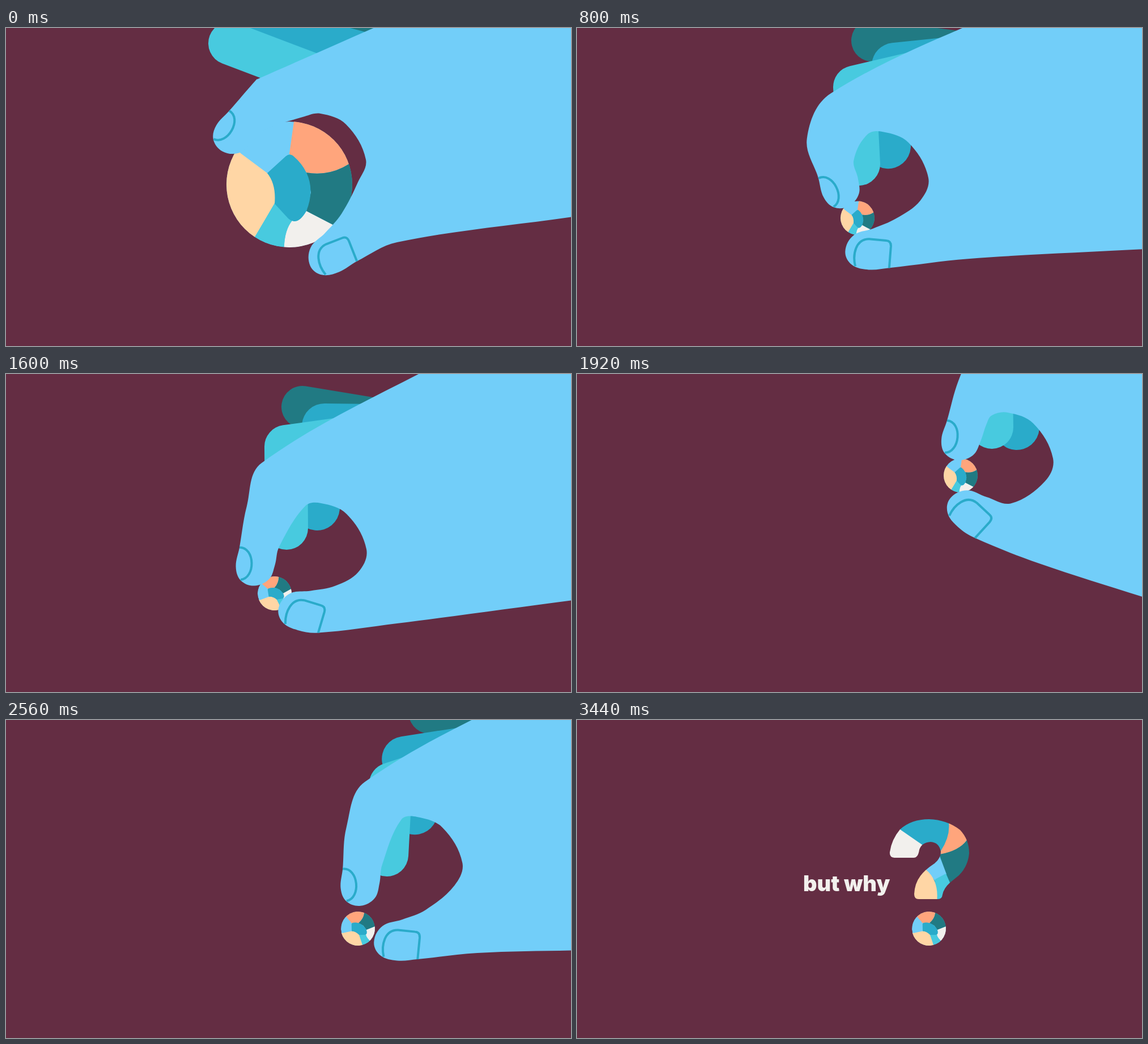
These frames come from a looping animation (997x561 px, 3.52 s). An HTML page:

```html
<!DOCTYPE html>
<html lang="en">
<head>
<meta charset="utf-8">
<title>but why?</title>
<style>
html, body { margin: 0; height: 100%; overflow: hidden; background: #642d43; }
svg { display: block; width: 100vw; height: 100vh; }
text { font: 900 38px Inter, sans-serif; fill: #f2f0ed; }
.nail { fill: none; stroke: #2aabca; stroke-width: 4; }
.finger { fill: none; stroke-linecap: round; stroke-linejoin: round; }
.peach { fill: #ffd6a5; } .orange { fill: #ffa57c; } .white { fill: #f2f0ed; }
.sky { fill: #72cef9; } .blue { fill: #2aabca; } .cyan { fill: #48cadf; } .teal { fill: #217a83; }
</style>
</head>
<body>
<svg viewBox="0 0 997 561">
  <defs>
    <clipPath id="disc"><circle r="111"/></clipPath>
    <clipPath id="hook"><path d="M552 233Q555 211 570 193Q590 175 621 175Q653 176 676 194Q692 211 692 235Q690 258 674 274L658 287Q647 297 645 308Q644 316 637 316H603Q595 316 595 307Q596 288 606 275Q614 264 631 253Q642 244 642 232Q639 216 624 215Q608 216 604 229Q602 243 594 243H560Q551 242 552 233Z"/></clipPath>
    <mask id="reveal"><path id="trail" d="M620 325C620 270 667 275 667 232C667 195 640 195 622 195C595 195 578 215 577 250" fill="none" stroke="#fff" stroke-width="72" pathLength="1" stroke-dasharray="1 2"/></mask>
  </defs>
  <g id="back">
    <path id="teal" class="finger" stroke="#217a83" stroke-width="74"/>
    <path id="blue" class="finger" stroke="#2aabca" stroke-width="80"/>
    <path id="cyan" class="finger" stroke="#48cadf" stroke-width="76"/>
  </g>
  <g id="ball"><g clip-path="url(#disc)">
    <circle r="111" class="sky"/>
    <path class="peach" d="M-130-111L-86-55L-39-20Q-20 0-25 34L-70 107L-130 130Z"/>
    <path class="orange" d="M10-125L0-54L30-21Q70-14 105-36L140-54V-125Z"/>
    <path class="teal" d="M30-21Q70-14 105-36L140-54V104L30 47L38 14Z"/>
    <path class="white" d="M30 47L140 104V130H-9Q-12 85 5 62Z"/>
    <path class="cyan" d="M-26 33L5 64Q-12 85-9 130H-80L-60 91Z"/>
    <path class="blue" d="M-39-20L-6-50Q0-55 6-51Q22-38 30-21Q45 10 30 47Q19 66 8 65Q2 64-2 60L-26 34Q-23 0-39-20Z"/>
  </g></g>
  <g id="front">
    <path id="hand" class="sky"/>
    <path id="index" class="nail" d="M0 0C14 0 21 14 21 28C21 42 14 56 1 57"/>
    <path id="thumb" class="nail" d="M0 0C-6-20-2-48 22-49L52-48Q61-48 61-38L60 0"/>
  </g>
  <g clip-path="url(#hook)"><g mask="url(#reveal)">
    <path class="blue" d="M545 170H700V320H545Z"/>
    <path class="white" d="M540 173L570 193L609 220L605 250H540Z"/>
    <path class="orange" d="M656 170V181Q659 205 642 231V237Q674 231 688 212L700 190V170Z"/>
    <path class="teal" d="M640 237Q674 231 688 212L700 205V300L658 287L640 245Z"/>
    <path class="sky" d="M610 255L640 240L652 272L632 284L617 265Z"/>
    <path class="cyan" d="M632 281L651 271L658 287L662 320H630Z"/>
    <path class="peach" d="M585 255L612 260L617 265Q639 285 635 320H585Z"/>
  </g></g>
  <text id="words" x="399">but why</text>
</svg>
<script>
const LOOP = 3520, STEP = 80;
const el = id => document.getElementById(id);

// Rigid parts of the hand, each in its own frame.
const INDEX = [[14,-72], [0,0], [-7,34], [1,58], [25,68], [51,57], [62,32], [70,0]];
const WEB = [[-108,-76], [-80,-81], [-35,-62], [0,0], [-14,40]];
const THUMB = [[68,-88], [28,-68], [-6,-54], [-19,-25], [-6,-2], [24,5], [60,0]];

// index, thumb: x, y, angle. knuckle: x, y, slope of the back of the hand.
// cyan, blue: knuckle and tip of a curled finger. ball: x, y, radius, angle.
const open = {
  index: [394,146,30], thumb: [564,435,-23], knuckle: [444,90,.44], web: [635,232], heel: [690,378], wrist: [1000,333],
  cyan: [580,97,395,27], blue: [640,50,450,0], teal: [560,-20], ball: [500,276,111,0]
};
const pinch = {
  index: [426,263,-27], thumb: [491,418,3], knuckle: [448,113,.48], web: [620,262], heel: [690,405], wrist: [1000,388],
  cyan: [490,102,497,238], blue: [560,64,549,206], teal: [521,20], ball: [495,333,30,0]
};
const roll = {
  index: [412,306,-1], thumb: [493,441,15], knuckle: [451,157,.56], web: [636,309], heel: [690,440], wrist: [1000,399],
  cyan: [494,128,495,272], blue: [562,92,549,236], teal: [523,58], ball: [474,387,30,-57]
};
const lift = {
  index: [653,82,5], thumb: [657,250,41], knuckle: [695,-28,1], web: [840,149], heel: [815,334], wrist: [1010,397],
  cyan: [730,-30,732,94], blue: [790,-60,776,94], teal: [800,-120], ball: [677,179,30,0]
};
const lower = {
  index: [580,233,-6], thumb: [649,389,6], knuckle: [618,80,.44], web: [785,226], heel: [820,385], wrist: [1000,385],
  cyan: [662,83,656,210], blue: [682,38,703,131], teal: [730,-40], ball: [630,318,30,-37]
};
const leave = {
  index: [779,156,-5], thumb: [878,304,-11], knuckle: [826,0,1.4], web: [1040,115], heel: [997,275], wrist: [1250,230],
  cyan: [885,10,873,117], blue: [945,-30,941,68], teal: [960,-140], ball: [621,368,30,-49]
};

const linear = p => p;
const easeIn = p => p * p;
const easeOut = p => p * (2 - p);
const easeBoth = p => p < .5 ? 2 * p * p : 1 - 2 * (1 - p) ** 2;
const progress = (t, from, to) => Math.max(0, Math.min(1, (t - from) / (to - from)));

function key(time, pose, ease, move = [0, 0], ball = pose.ball) {
  return { time, ease, pose: { ...pose, move, ball } };
}

const gone = [300, -180], down = [-9, 43];
const keys = [
  key(0, open),
  key(560, pinch, easeBoth),
  key(1120, pinch, linear, [0, 5], [495, 338, 30, 0]),
  key(1440, roll, easeBoth, [-4, 2], [470, 389, 30, -57]),
  key(1600, roll, easeBoth),
  key(1920, lift, easeBoth),
  key(2240, lower, easeIn),
  key(2400, lower, easeOut, down, leave.ball),
  key(2440, lower, linear, down, leave.ball),
  key(2800, leave, easeIn),
  key(3040, leave, linear, gone),
  key(LOOP, leave, linear, gone)
];

function poseAt(t) {
  const n = keys.findIndex(k => k.time > t), a = keys[n - 1], b = keys[n];
  const p = b.ease(progress(t, a.time, b.time)), pose = {};
  for (const part in a.pose) pose[part] = a.pose[part].map((v, i) => v + (b.pose[part][i] - v) * p);
  return pose;
}

function place(points, [x, y, angle = 0]) {
  const c = Math.cos(angle * Math.PI / 180), s = Math.sin(angle * Math.PI / 180);
  return points.map(([u, v]) => [x + u * c - v * s, y + u * s + v * c]);
}

// Smooth curve through points, handles scaled to each span.
function curve(pts) {
  const at = i => pts[Math.max(0, Math.min(pts.length - 1, i))];
  const dir = i => {
    const [ax, ay] = at(i - 1), [bx, by] = at(i + 1), len = Math.hypot(bx - ax, by - ay) || 1;
    return [(bx - ax) / len, (by - ay) / len];
  };
  let d = "M" + pts[0];
  for (let i = 0; i < pts.length - 1; i++) {
    const [x0, y0] = at(i), [x1, y1] = at(i + 1), u = dir(i), v = dir(i + 1);
    const h = Math.hypot(x1 - x0, y1 - y0) * .35;
    d += `C${[x0 + u[0] * h, y0 + u[1] * h, x1 - v[0] * h, y1 - v[1] * h, x1, y1]}`;
  }
  return d;
}

function drawHand({ index, thumb, knuckle, web, heel, wrist, move, ...fingers }) {
  const [kx, ky, slope] = knuckle;
  const outline = [
    [kx + 350, ky - 350 * slope], [kx, ky],
    ...place(INDEX, index), ...place(WEB, web), ...place(THUMB, thumb),
    heel, wrist
  ];
  el("hand").setAttribute("d", curve(outline) + `L1700 ${wrist[1]}V-600Z`);
  el("index").setAttribute("transform", `translate(${index[0]} ${index[1]}) rotate(${index[2]})`);
  el("thumb").setAttribute("transform", `translate(${thumb[0]} ${thumb[1]}) rotate(${thumb[2]})`);
  for (const id of ["teal", "blue", "cyan"])
    el(id).setAttribute("d", `M${web[0] + 105} ${web[1] - 215}L${fingers[id]}`);
  for (const id of ["back", "front"]) el(id).setAttribute("transform", `translate(${move})`);
}

function draw(t) {
  const pose = poseAt(t), [x, y, r, angle] = pose.ball;
  drawHand(pose);
  el("ball").setAttribute("transform", `translate(${x} ${y}) rotate(${angle}) scale(${r / 111})`);

  const rise = 1 - progress(t, 2600, 2950);
  el("words").setAttribute("y", 302 + 43 * rise * rise);
  el("words").setAttribute("opacity", progress(t, 2600, 2720));
  el("trail").setAttribute("stroke-dashoffset", 1 - easeOut(progress(t, 2900, 3400)));
}

function tick() {
  draw(Math.floor(performance.now() % LOOP / STEP) * STEP);
  requestAnimationFrame(tick);
}
tick();
</script>
</body>
</html>
```
